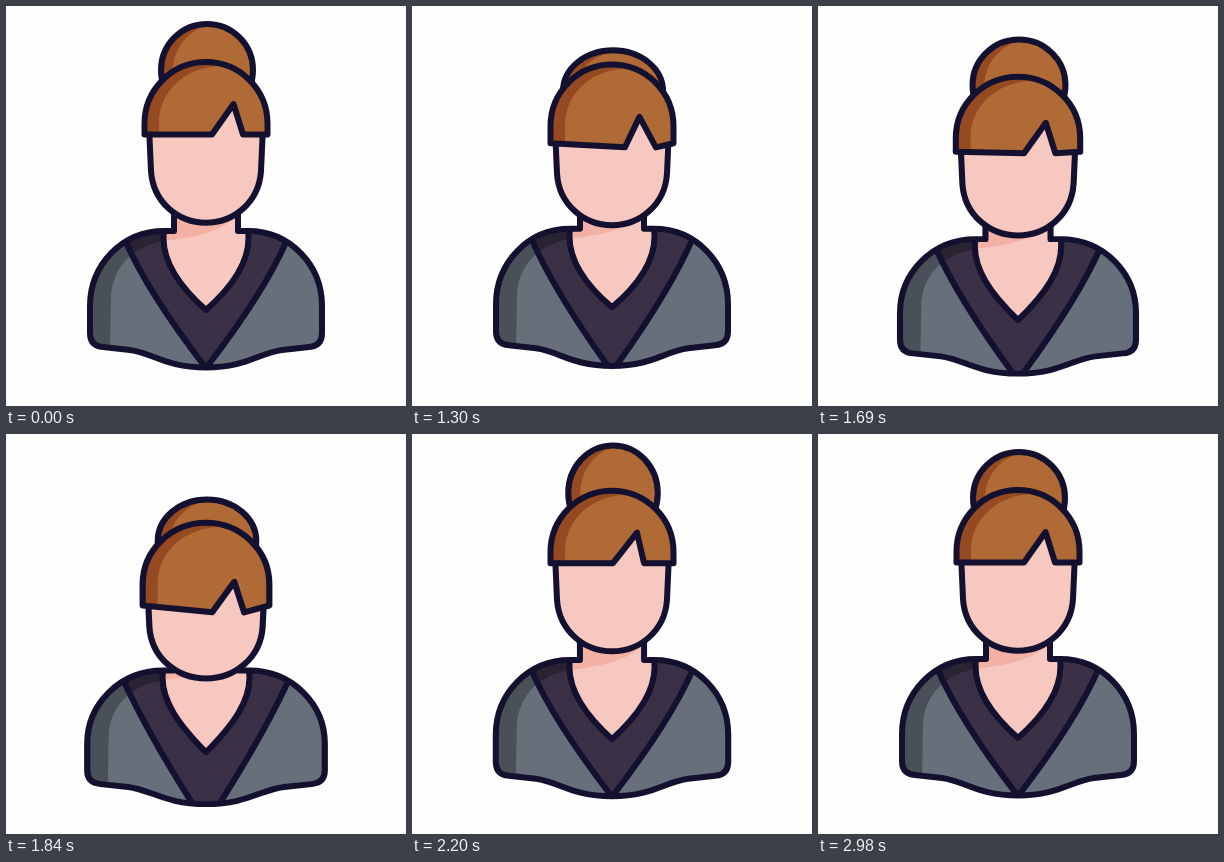
Animation of 400x400 px, one loop 3010 ms. Source, as an HTML page with a canvas:

```html
<!DOCTYPE html>
<html lang="en">
<head>
<meta charset="utf-8">
<title>Bouncing avatar</title>
<style>
html, body { margin: 0; width: 100%; height: 100%; overflow: hidden; background: #fefefe; }
canvas { display: block; }
</style>
</head>
<body>
<canvas id="stage" width="400" height="400"></canvas>
<script>
const ctx = document.getElementById('stage').getContext('2d');
const LOOP = 3010, START = 1030, STEP = 30;
const INK = '#13112f', HAIR = '#b06a36', HAIR_DARK = '#964a22', SKIN = '#f6c8c0',
  SKIN_DARK = '#f3b0a5', COAT = '#67707a', COLLAR = '#3b3146', SHADE = 'rgba(0,0,0,.29)';

// Cosine easing from one turning point [time, offset] to the next
const swing = (...turns) => t => {
  const i = turns.findIndex(turn => turn[0] > t);
  if (i === 0) return turns[0][1];
  if (i < 0) return turns[turns.length - 1][1];
  const [t0, a] = turns[i - 1], [t1, b] = turns[i];
  return a + (b - a) * (1 - Math.cos(Math.PI * (t - t0) / (t1 - t0))) / 2;
};

// Two hops, then a small settling wobble
const headY = swing([1000, 0], [1150, 29], [1420, -16], [1480, -16], [1830, 28],
  [2060, -5], [2280, 3], [2500, 0]);
const bunY = swing([1040, 0], [1210, 43], [1450, -11], [1540, -11], [1860, 48],
  [2110, -10], [2360, 2], [2600, 0]);
const fringeY = swing([1030, 0], [1100, -6], [1260, 11], [1560, -6], [1840, 17], [2080, 0]);
const fringeX = swing([1100, 0], [1280, 7], [1520, 0], [2030, 0], [2200, -5], [2400, 0]);
// The torso leads the head a little; the collar opens while either is low
const torsoY = t => 0.45 * headY(t + 30);
const collarGap = t => 0.25 * Math.max(0, headY(t + 30) + headY(t - 70));

function paint(path, fill) {
  ctx.fillStyle = fill;
  ctx.fill(path);
}

function inside(path, draw) {
  ctx.save();
  ctx.clip(path);
  draw();
  ctx.restore();
}

function drawBun(t) {
  const wide = 0.17 * (bunY(t) - headY(t));
  const rx = 46 + wide, ry = 46 - wide * 1.3, cy = 18 + bunY(t) + ry;
  const oval = x => {
    const p = new Path2D();
    p.ellipse(x, cy, rx, ry, 0, 0, Math.PI * 2);
    return p;
  };
  const bun = oval(201);
  paint(bun, HAIR_DARK);
  inside(bun, () => paint(oval(213), HAIR));
  ctx.stroke(bun);
}

function drawTorso(t) {
  const s = torsoY(t), sy = 1 - s * 0.25 / 136, sx = 1 + Math.max(0, s) * 0.0021;
  const ty = 225 + s - 225 * sy;
  const neckTop = Math.min(224, (198 + headY(t) - ty) / sy);
  const tip = 304 + s * 0.4, gap = collarGap(t);
  ctx.save();
  ctx.transform(sx, 0, 0, sy, 200 - 200 * sx, ty);

  const body = new Path2D(`M168 ${neckTop}V225H158C116 225 84 259 84 300V327
    Q84 340 97 341L124 344C147 347 160 361.5 200 361.5C240 361.5 253 347 276 344L303 341
    Q316 340 316 327V300C316 259 284 225 242 225H232V${neckTop}`);
  const vee = `C154 255 175 282 200 ${tip}C225 282 246 255 242 225`;
  const skin = new Path2D(`M168 ${neckTop}V225H158${vee}H232V${neckTop}Z`);
  const left = `M119 234Q142 287 ${200 - gap} 362`;
  const right = `Q258 287 281 234`;
  const collar = new Path2D(`${left}H${200 + gap}${right}L260 215H140Z`);
  const seams = new Path2D(`${left}M${200 + gap} 362${right}M158 225${vee}`);
  const shade = new Path2D('M104 350L105 290C107 260 128 240 158 235V215H70V350Z');
  const neckShade = new Path2D(`M150 235Q212 232 234 207V${neckTop - 5}H150Z`);

  paint(body, COAT);
  inside(body, () => {
    paint(collar, COLLAR);
    paint(shade, SHADE);
    paint(skin, SKIN);
    inside(skin, () => paint(neckShade, SKIN_DARK));
    ctx.stroke(seams);
  });
  ctx.stroke(body);
  ctx.restore();
}

function drawHead(t) {
  const dy = headY(t), squash = Math.max(0, dy - 4) / 24;
  const drop = fringeY(t), lean = fringeX(t);
  ctx.save();
  ctx.translate(200, dy);
  ctx.scale(1 + squash * 0.03, 1);
  ctx.translate(-200, 0);

  const face = new Path2D(`M160 88L143 120L145 165C147 196 172 216.7 200 216.7
    C228 216.7 253 196 255 165L257 120L240 88Z`);
  paint(face, SKIN);
  ctx.stroke(face);

  ctx.translate(0, squash * 5);
  const side = 128.5 + drop * 0.6, mid = 128.5 + drop;
  const peakX = 227.5 + Math.min(0, lean) * 0.5, peakY = 98 + Math.max(0, drop);
  const hair = new Path2D(`M138.5 ${side}V117.5A61.5 61.5 0 0 1 261.5 117.5V${side}
    L${237 + lean} ${mid}L${peakX} ${peakY}L${206 + lean} ${mid}Z`);
  const crescent = new Path2D('M153 160V117C153 85 180 60 216 60V50H130V160Z');
  paint(hair, HAIR);
  inside(hair, () => paint(crescent, HAIR_DARK));
  ctx.stroke(hair);
  ctx.restore();
}

function render(t) {
  ctx.fillStyle = '#fefefe';
  ctx.fillRect(0, 0, 400, 400);
  ctx.strokeStyle = INK;
  ctx.lineWidth = 6;
  ctx.lineCap = ctx.lineJoin = 'round';
  drawBun(t);
  drawTorso(t);
  drawHead(t);
}

let began;
function tick(now) {
  began ??= now;
  const t = (now - began) % LOOP;
  render(t < START ? 0 : START + Math.floor((t - START) / STEP) * STEP);
  requestAnimationFrame(tick);
}
render(0);
requestAnimationFrame(tick);
</script>
</body>
</html>
```
